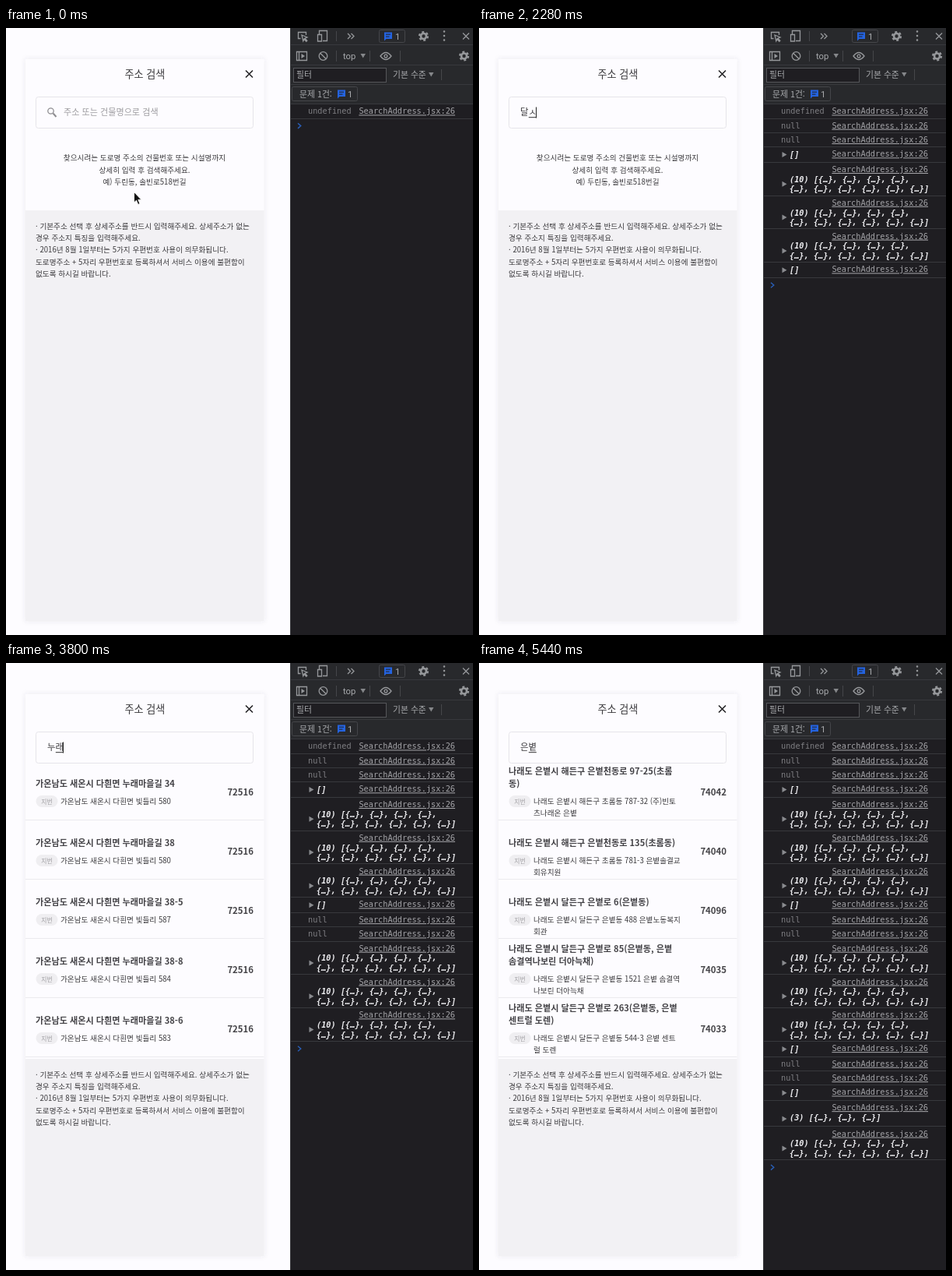
Recreate the animation shown at these times as an HTML page. Size 600 by 779 pixels, loop 5.52 s.

```html
<!DOCTYPE html>
<html lang="ko">
<head>
<meta charset="utf-8">
<title>주소 검색</title>
<style>
  html, body { margin: 0; width: 100%; height: 100%; overflow: hidden; background: #fdfcff; }
  svg { display: block; width: 600px; height: 779px; }
  text { font-family: "Noto Sans CJK KR", "Noto Sans CJK", sans-serif; fill: #3a393c; }
  .title { font-size: 13.1px; text-anchor: middle; font-weight: 500; }
  .body { font-size: 9.63px; }
  .mid { text-anchor: middle; }
  .hint { font-size: 11.1px; fill: #9d9ca0; }
  .query { font-size: 11.4px; }
  .road { font-size: 11.12px; font-weight: 600; fill: #444347; }
  .code { font-size: 11.4px; font-weight: 600; fill: #444347; text-anchor: end; }
  .tag { font-size: 7.8px; fill: #a09fa3; text-anchor: middle; }
  .dev { font-size: 10.8px; fill: #a9abae; }
  .latin { font-family: Roboto, sans-serif; font-size: 11.3px; fill: #a9abae; }
  .mono { font-family: "DejaVu Sans Mono", monospace; font-size: 10.28px; fill: #7f7f83; }
  .link { fill: #a4a4a8; text-decoration: underline; text-anchor: end; }
  .value { fill: #ededf0; font-weight: bold; font-style: italic; }
  .icon { fill: none; stroke: #96989b; stroke-width: 1.3; }
  .rule { fill: none; stroke: #38393d; }
</style>
</head>
<body>
<svg viewBox="0 0 600 779">
  <defs>
    <filter id="soft" x="-10%" y="-5%" width="120%" height="110%">
      <feDropShadow dx="0" dy="0" stdDeviation="3" flood-color="#504b5a" flood-opacity=".11"/>
    </filter>
    <g id="gear">
      <circle r="3.5" fill="none" stroke="#96989b" stroke-width="2.6"/>
      <circle r="5.4" fill="none" stroke="#96989b" stroke-width="2.4" stroke-dasharray="2.83 2.825"/>
    </g>
    <g id="issue">
      <path d="M-5-5H5V3.5H-2.5L-5 6Z" fill="#2463df"/>
      <path d="M-3-2.3H3M-3 .6H1.5" stroke="#202124"/>
    </g>
  </defs>

  <rect width="600" height="779" fill="#fdfcff"/>
  <rect x="25" y="40" width="306.5" height="721" fill="#fdfcff" filter="url(#soft)"/>
  <text class="title" x="178.5" y="63.5">주소 검색</text>
  <path d="M308 54.5l9 9m0-9l-9 9" stroke="#252427" stroke-width="1.6"/>
  <g id="panel"></g>
  <rect x="38.5" y="88.5" width="279" height="40" rx="3" fill="none" stroke="#e6e5e9"/>
  <g id="field"></g>
  <path id="pointer" d="M164.5 210.5v13.5l3-2.8 2.2 5.3 2.3-1-2.2-5.1h4.1z" fill="#111" stroke="#fff" stroke-width=".9"/>

  <rect x="365" width="235" height="779" fill="#1f1e22"/>
  <rect x="365" width="235" height="97" fill="#28292c"/>
  <path class="rule" d="M365.5 0V779M365 21.5H600M365 47.5H600M365 72.5H600M365 97.5H600"/>
  <path d="M424.5 4V17M424.5 29V43M467.5 29V43M506.5 29V43M559.5 53V67" stroke="#45464a"/>
  <path class="icon" d="M378.5 13.5H375.5V5.5H385.5V9M380 9l7 3-3 1.2 2.8 3-1 1-2.8-3-1.2 2.6zM402.5 8V3.5H412.5V8M400.5 8.5H405.5V17H400.5zM407 16.5H412.5V8M439 7l3.5 3.5-3.5 3.5M443.5 7l3.5 3.5-3.5 3.5M587 6.5l8 8m0-8l-8 8M373.5 30.5H386.5V41.5H373.5zM376.5 31V41"/>
  <path d="M379.5 33l4.5 3-4.5 3z" fill="#96989b"/>
  <g class="icon"><circle cx="407.5" cy="36" r="5.3"/><path d="M404 32.5l7 7M481 36q7-9 14 0q-7 9-14 0z"/><circle cx="488" cy="36" r="1.9"/></g>
  <path d="M563 4.5v.01M563 10v.01M563 15.5v.01" stroke="#96989b" stroke-width="2.6" stroke-linecap="round"/>
  <g fill="none" stroke="#45464a"><rect x="479.5" y="2.5" width="33" height="16" rx="2"/><rect x="367.5" y="75.5" width="84" height="18" rx="2"/></g>
  <rect x="369.5" y="51.5" width="119" height="18" fill="#1f1e22" stroke="#55565a"/>
  <use href="#issue" x="491" y="10.5"/><use href="#issue" x="431" y="84.5"/>
  <use href="#gear" x="536.5" y="10.5"/><use href="#gear" x="588.5" y="36"/>
  <path d="M455.5 33h6.5l-3.25 5.5zM543 57h6.5l-3.25 5.5z" fill="#85878a"/>
  <text class="latin" x="500" y="14.5">1</text>
  <text class="latin" x="433" y="40">top</text>
  <text class="dev" x="373" y="64">필터</text>
  <text class="dev" x="497" y="63.5">기본 수준</text>
  <text class="dev" x="377" y="88.5">문제 1건:</text>
  <text class="latin" x="439" y="88.5">1</text>
  <g id="console"></g>
</svg>
<script>
const LOOP = 5520, BLINK = 200, ROW = 76;

// [time, text in the field]
const keys = [
  [240, 'ㄷ'], [360, '다'], [520, '달'], [1120, '달ㅅ'], [1240, '달소'], [1360, '달솜'],
  [2160, '달소'], [2240, '달ㅅ'], [2320, '달'], [2400, '다'], [2440, 'ㄷ'], [2480, ''],
  [2800, 'ㄴ'], [2880, '누'], [3040, '눌'], [3280, '누래'],
  [3880, '눌'], [3960, '누'], [4040, 'ㄴ'], [4120, ''],
  [4240, 'ㅇ'], [4280, '으'], [4320, '은'], [4360, '은ㅂ'], [4400, '은벼'], [4440, '은볕']
];

// [time, logged value]; a number is the length of a logged array
const logs = [
  [0, undefined], [320, null], [440, null], [1200, 0], [1280, 10], [1400, 10],
  [2200, 10], [2280, 0], [2360, null], [2440, null], [2880, 10], [3080, 10], [3280, 10],
  [3920, 0], [4000, null], [4080, null], [4360, 0], [4440, 3], [4480, 10]
];

const avenue = (no, lot, code, under = '') =>
  [`한솔특별시 달솜구 달솜대로 ${under}${no}(별찬동)`, `한솔특별시 달솜구 별찬동 ${lot}`, code];
const village = (no, lot) =>
  [`가온남도 새온시 다흰면 누래마을길 ${no}`, `가온남도 새온시 다흰면 빛들리 ${lot}`, '72516'];
const city = (road, lot, code) => [`나래도 은볕시 ${road}`, `나래도 은볕시 ${lot}`, code];

// "|" marks a line break
const results = [
  [0, [
    avenue(415, '943-7 달솜역 포레첸', '00252'),
    avenue(427, '937-25 달솜427타워', '00241'),
    avenue(439, '937-31 마륜달솜타|워', '00241'),
    avenue(463, '936-24 달솜센타빌딩', '00232'),
    avenue(471, '969 달솜역', '00232', '지하')
  ]],
  [2700, [village('34', 580), village('38', 580), village('38-5', 587), village('38-8', 584), village('38-6', 583)]],
  [4220, [
    city('해든구 은볕천동로 97-25(초롬|동)', '해든구 초롬동 787-32 (주)빈토|츠나래온 은볕', '74042'),
    city('해든구 은볕천동로 135(초롬동)', '해든구 초롬동 781-3 은볕솔결교|회유치원', '74040'),
    city('달든구 은볕로 6(은볕동)', '달든구 은볕동 488 은볕노동복지|회관', '74096'),
    city('달든구 은볕로 85(은볕동, 은볕|솜결역나보린 더아늑채)', '달든구 은볕동 1521 은볕 솜결역|나보린 더아늑채', '74035'),
    city('달든구 은볕로 263(은볕동, 은볕|센트럴 도렌)', '달든구 은볕동 544-3 은볕 센트|럴 도렌', '74033')
  ]]
];

const guide = ['찾으시려는 도로명 주소의 건물번호 또는 시설명까지', '상세히 입력 후 검색해주세요.', '예) 두린동, 솔빈로518번길'];
const notes = ['· 기본주소 선택 후 상세주소를 반드시 입력해주세요. 상세주소가 없는', '경우 주소지 특징을 입력해주세요.',
  '· 2016년 8월 1일부터는 5가지 우편번호 사용이 의무화됩니다.', '도로명주소 + 5자리 우편번호로 등록하셔서 서비스 이용에 불편함이', '없도록 하시길 바랍니다.'];

const text = (cls, x, y, s) => `<text class="${cls}" x="${x}" y="${y}">${s}</text>`;
const lines = (cls, x, y, list, step) => list.map((s, i) => text(cls, x, y + i * step, s)).join('');
const latest = (list, t) => list.filter(e => e[0] <= t).pop();

function resultRow([road, lot, code], i) {
  const y = 126 + i * ROW, roads = road.split('|');
  return lines('road', 38, y + 49 - 16 * roads.length, roads, 16) +
    `<rect x="38.5" y="${y + 44}" width="28" height="15" rx="7.5" fill="#efeef1"/>` +
    text('tag', 52.5, y + 54.5, '지번') +
    lines('body', 70, y + 54.7, lot.split('|'), 15.3) +
    text('code', 318, y + 44.3, code) +
    `<path d="M25 ${y + 75.5}H331.5" stroke="#ebeaee"/>`;
}

function drawPanel(t) {
  const rows = latest(results, t)[1].slice(0, latest(logs, t)[1] || 0);
  const top = rows.length ? 128 + ROW * rows.length : 234;
  return (rows.length ? rows.map(resultRow).join('') : lines('body mid', 178, 170.4, guide, 15.4)) +
    `<rect x="25" y="${top}" width="306.5" height="${761 - top}" fill="#f2f1f4"/>` +
    lines('body', 38, top + 23.5, notes, 15.35);
}

function drawField(t) {
  const [since, typed] = latest(keys, t) || [-1, ''];
  const end = 53 + 10.4 * typed.length;
  const caret = since >= 0 && Math.floor((t - since) / BLINK) % 2 === 0;
  return (typed
    ? text('query', 53, 112.3, typed) + `<path d="M${end - 10} 114.7H${end}" stroke="#333"/>`
    : text('hint', 74, 112, '주소 또는 건물명으로 검색') +
      '<g fill="none" stroke="#8d8c90"><circle cx="57.5" cy="106.5" r="3.7" stroke-width="1.3"/><path d="M60.5 109.5l4 4.5" stroke-width="2"/></g>') +
    (caret ? `<path d="M${Math.floor(end) + .5} 101.5V115.5" stroke="#222"/>` : '');
}

function arrayLines(n) {
  const items = count => Array(count).fill('{…}').join(', ');
  if (!n) return ['[]'];
  return n < 5 ? [`(${n}) [${items(n)}]`] : [`(${n}) [${items(4)},`, `${items(n - 4)}]`];
}

function drawConsole(t) {
  let y = 97.7, out = '';
  for (const [, value] of logs.filter(e => e[0] <= t)) {
    let height = 18.3;
    out += text('mono link', 577, y + 12.7, 'SearchAddress.jsx:26');
    if (value == null) {
      out += text('mono', 388, y + 12.7, String(value));
    } else {
      height = value > 5 ? 42.8 : value ? 33.5 : 19.7;
      const middle = value ? (value > 5 ? 28 : 23.5) : 10;
      out += `<path d="M389.5 ${y + middle - 3.5}l6 3.5-6 3.5z" fill="#8a8b8f"/>` +
        lines('mono value', 399, y + (value ? 25.4 : 13.2), arrayLines(value), 12.5);
    }
    y += height;
    out += `<path class="rule" d="M366 ${Math.floor(y) + .5}H600"/>`;
  }
  return out + `<path d="M375 ${y + 6.3}l3.8 3.3-3.8 3.3" fill="none" stroke="#2a5fb8" stroke-width="1.4"/>`;
}

const byId = id => document.getElementById(id);
const shown = {};
function update(id, markup) {
  if (shown[id] !== markup) byId(id).innerHTML = shown[id] = markup;
}

const start = performance.now();
function frame() {
  const t = (performance.now() - start) % LOOP;
  update('panel', drawPanel(t));
  update('field', drawField(t));
  update('console', drawConsole(t));
  byId('pointer').style.display = t < keys[0][0] ? '' : 'none';
  requestAnimationFrame(frame);
}
frame();
</script>
</body>
</html>
```
